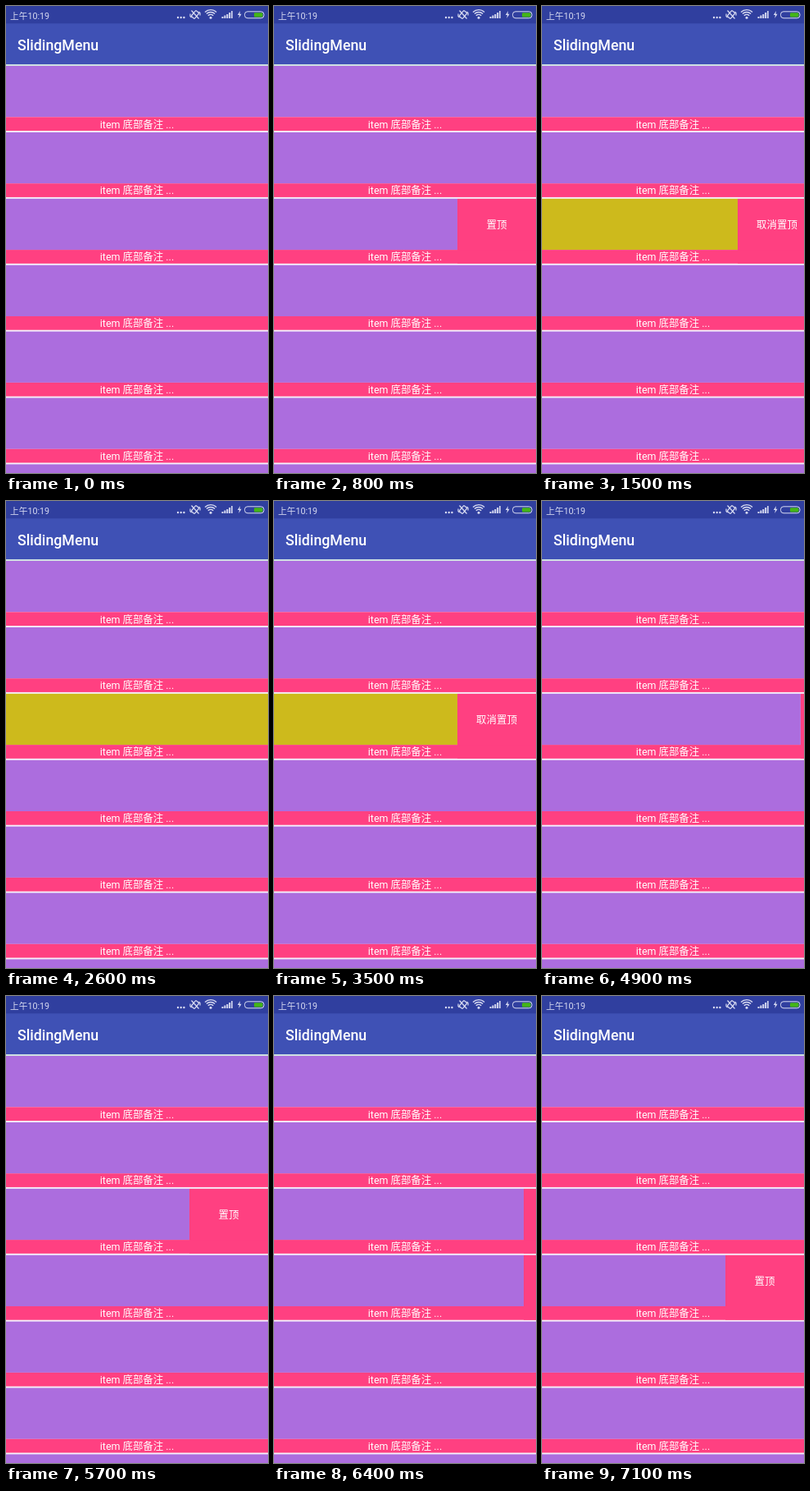
An HTML page for the animation above (8000 ms loop, 320x569 px).

```html
<!DOCTYPE html>
<html lang="zh">
<head>
<meta charset="utf-8">
<style>
  html, body { margin: 0; width: 100%; height: 100%; overflow: hidden; background: #f6f0fa; }
  svg { display: block; width: 320px; height: 569px; }
  text { font: 12.44px Roboto, "Noto Sans CJK SC", "Noto Sans CJK", sans-serif; fill: #fff; }
  .mid { text-anchor: middle; }
  .clock { font-size: 10.7px; fill: #d9dcf2; }
  .title { font-size: 17.78px; font-weight: 500; }
  .line { fill: none; stroke: #d9dcf2; stroke-width: 1.2; }
  .solid { fill: #d9dcf2; }
</style>
</head>
<body>
<svg viewBox="0 0 320 569">
  <g id="list"></g>
  <rect y="71" width="320" height="2" fill="#cfe0e2"/>
  <rect width="320" height="71" fill="#3f51b5"/>
  <rect width="320" height="21.3" fill="#303f9f"/>
  <text class="clock" x="5" y="15.5">上午10:19</text>
  <text class="title" x="14" y="53.5">SlidingMenu</text>
  <g class="solid">
    <circle cx="210" cy="14" r="1.2"/><circle cx="213.7" cy="14" r="1.2"/><circle cx="217.4" cy="14" r="1.2"/>
    <circle cx="250" cy="14.3" r="1.5"/>
    <path d="M263.5 13h2v2h-2zM266.4 11.5h2v3.5h-2zM269.3 10h2v5h-2zM272.2 8h2v7h-2zM275.1 6h1.6v9h-1.6z"/>
    <path d="M286 6l-3.2 5h2.2l-.8 4 3.4-5.2h-2.2z"/>
  </g>
  <g class="line">
    <path d="M246.8 11.8a4.6 4.6 0 0 1 6.4 0M244.9 9.6a7.4 7.4 0 0 1 10.2 0M243 7.4a10.2 10.2 0 0 1 14 0" stroke-width="1.4"/>
    <rect x="228.4" y="6" width="5.2" height="9" rx="1" transform="rotate(40 231 10.5)"/>
    <path d="M226.5 5.5l9 10M225 9.5v3l1.5 1.5M237 11.5v-3l-1.5-1.5"/>
    <rect x="291.5" y="6.8" width="23.5" height="8" rx="3.5" stroke-width="1"/>
  </g>
  <rect x="303" y="8.2" width="10.5" height="5.2" rx="1.2" fill="#43b516"/>
</svg>
<script>
const PURPLE = "#ac6dde", YELLOW = "#cdba1c", PINK = "#ff4081";
const MENU = 96, LOOP = 8000, STEP = 100;

const rows = Array.from({ length: 7 }, (_, i) => {
  const row = document.createElementNS("http://www.w3.org/2000/svg", "g");
  row.setAttribute("transform", `translate(0 ${73 + 80.9 * i})`);
  row.innerHTML = `
    <g>
      <rect width="320" height="62.3" fill="${PURPLE}"/>
      <rect x="320" width="${MENU}" height="79" fill="${PINK}"/>
      <text class="mid" x="368" y="36.2">置顶</text>
    </g>
    <rect y="62.3" width="320" height="16.7" fill="${PINK}"/>
    <text class="mid" x="160" y="75.6">item 底部备注 ...</text>`;
  document.getElementById("list").append(row);
  return {
    slider: row.querySelector("g"),
    cover: row.querySelector("rect"),
    label: row.querySelector("text")
  };
});

// Smooth 0..1 progress between two times
function ramp(t, from, to) {
  const p = Math.min(1, Math.max(0, (t - from) / (to - from)));
  return p * p * (3 - 2 * p);
}

function slide(row, amount) {
  row.slider.setAttribute("transform", `translate(${-MENU * amount} 0)`);
}

function draw(t) {
  const pinned = t >= 1500 && t < 3900;
  const third = rows[2];
  third.cover.setAttribute("fill", pinned ? YELLOW : PURPLE);
  third.label.textContent = pinned ? "取消置顶" : "置顶";
  slide(third,
    ramp(t, 400, 800) - ramp(t, 1400, 1800) +
    ramp(t, 2700, 3500) - ramp(t, 3800, 4200) +
    ramp(t, 4800, 5600) - ramp(t, 6100, 6500));
  slide(rows[3], ramp(t, 6200, 7000));
}

const start = performance.now();
function tick() {
  const t = (performance.now() - start) % LOOP;
  draw(Math.floor(t / STEP) * STEP);
  requestAnimationFrame(tick);
}
tick();
</script>
</body>
</html>
```
